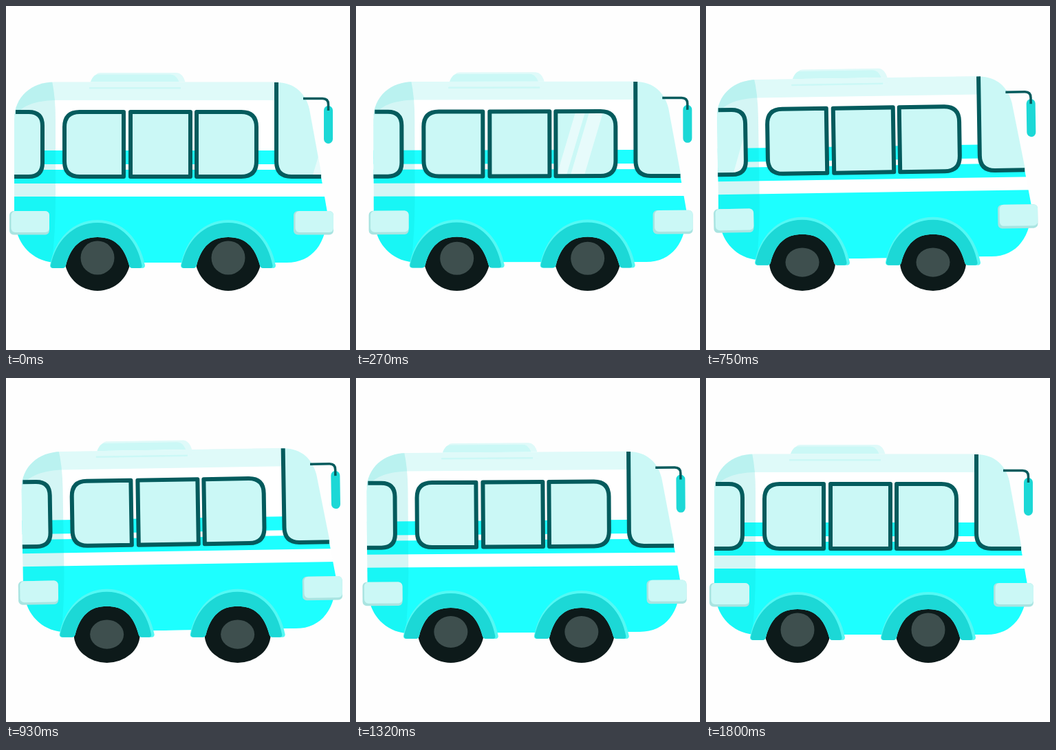
Recreate the animation shown at these times as an HTML page. Size 500 px wide and 500 px high, loop 1830 ms.

```html
<!DOCTYPE html>
<html lang="en">
<head>
<meta charset="utf-8">
<title>Bus</title>
<style>
  html, body { margin: 0; width: 100%; height: 100%; overflow: hidden; background: #fefefe; }
  svg { display: block; width: 100vw; height: 100vh; }
  .cyan { fill: #1dffff; }
  .pale { fill: #cbf8f6; }
  .mist { fill: #dffaf9; }
  .teal { fill: #1cd8d6; }
  .frame { fill: none; stroke: #045b5d; stroke-width: 6; stroke-linejoin: round; }
  .glint { fill: #fff; opacity: .55; }
</style>
</head>
<body>
<svg viewBox="0 0 500 500">
  <defs>
    <clipPath id="shell">
      <path d="M12 165C12 131 38 110.500 70 110.500H393C420 111 436 128 441 150L467 300C467 345 445 373 408 373H75C42 373 20 350 15 325L12 300Z"/>
    </clipPath>
    <g id="bumper">
      <rect width="58" height="34.500" rx="6" fill="#a9e4e1"/>
      <rect x="2.500" width="55.500" height="31" rx="6" class="pale"/>
    </g>
    <g id="fender">
      <path fill="#53f8f4" d="M-69 377C-62 339 -36 311 0 311C36 311 62 339 69 377Q69 381 65 381H51Q47 381 46 377C39 350 25 336 0 336C-25 336 -39 350 -46 377Q-47 381 -51 381H-65Q-69 381 -69 377Z"/>
      <path class="teal" d="M-68 377C-61 342 -36 315 0 315C35 315 58 342 64.500 377Q65 381 61 381H51Q47 381 46 377C39 350 25 336 0 336C-25 336 -39 350 -46 377Q-47 381 -51 381H-64Q-68 381 -68 377Z"/>
    </g>
    <g id="wheel">
      <circle cy="366" r="48" fill="#0d1a1a"/>
      <circle cy="366" r="24.500" fill="#3e4f4e"/>
    </g>
  </defs>
  <rect width="500" height="500" fill="#fefefe"/>
  <g id="bus">
    <g id="body">
      <path class="mist" d="M126 120C125 108 129 97 137 97H247C257 97 261 108 262 120Z"/>
      <path class="pale" d="M121 120.500C121 112 126 99.500 133 99.500H239C249 99.500 253 112 254 120.500Z"/>
      <g clip-path="url(#shell)">
        <rect width="500" height="400" fill="#fff"/>
        <path class="mist" d="M0 105H393V137H70C45 138 25 143 12 160H0Z"/>
        <path class="cyan" d="M0 210H393V230H0ZM0 238H480V258H0ZM0 277H480V380H0Z"/>
        <path fill="#00c8c3" opacity=".17" d="M0 105H66Q72 130 72 165V280Q72 330 66 380H0Z"/>
      </g>
      <path class="mist" d="M124 120.500H256V118H262V120.500Z"/>
      <path class="pale" d="M121 120.500V118H254V120.500Z"/>
      <g id="panes"></g>
      <rect class="teal" x="462" y="145" width="13" height="55" rx="6.500"/>
      <path class="frame" style="stroke-width:3.500" d="M432 134.500H460Q468.500 134.500 468.500 143V152"/>
    </g>
    <g id="wheels">
      <use href="#wheel" x="133"/>
      <use href="#wheel" x="323"/>
    </g>
    <g id="fenders">
      <use href="#fender" x="133"/>
      <use href="#fender" x="323"/>
    </g>
    <g id="bumpers">
      <use href="#bumper" x="5" y="298"/>
      <use href="#bumper" x="418" y="298"/>
    </g>
  </g>
</svg>
<script>
const LOOP = 1830, STEP = 30;
const $ = id => document.getElementById(id);

// Front to back, in the order the glint crosses them.
const panes = [
  { right: 459, clip: "M393 111C420 111 436 128 441 150L459 248H415Q393 248 393 226Z",
    frame: "M393 111V226Q393 248 415 248H458" },
  { right: 364, clip: "M277 154H342Q364 154 364 176V226Q364 248 342 248H277Z" },
  { right: 268, clip: "M181 154H268V248H181Z" },
  { right: 171, clip: "M171 154H107Q85 154 85 176V226Q85 248 107 248H171Z" },
  { right: 53, clip: "M15 154H33Q53 154 53 174V228Q53 248 33 248H12V165Z",
    frame: "M14 154H33Q53 154 53 174V228Q53 248 33 248H12" }
];

$("panes").innerHTML = panes.map(({ clip, frame = clip }, i) => `
  <clipPath id="pane${i}"><path d="${clip}"/></clipPath>
  <path class="pale" d="${clip}"/>
  <g clip-path="url(#pane${i})">
    <path class="glint" d="M0 151H14L-15 248H-29ZM20 151H40L11 248H-9Z"/>
  </g>
  <path class="frame" d="${frame}"/>`).join("");
const glints = document.querySelectorAll(".glint");

function ease(u) {
  u = Math.min(1, Math.max(0, u));
  const a = u ** 1.8, b = (1 - u) ** 1.8;
  return a / (a + b);
}

function draw(t) {
  const sway = 7 * (1 - Math.cos(2 * Math.PI * t / 600));
  const lift = t < 840 ? ease((t - 90) / 750) : ease((1740 - t) / 900);
  const tilt = `rotate(${-0.92 * lift} -160 360)`;

  $("bus").setAttribute("transform", `translate(${sway} 0)`);
  $("body").setAttribute("transform", tilt);
  $("bumpers").setAttribute("transform", tilt);
  $("fenders").setAttribute("transform", `translate(0 ${-4.4 * lift})`);
  $("wheels").setAttribute("transform", `translate(0 414) scale(1 ${1 - 0.14 * lift}) translate(0 -414)`);

  glints.forEach((glint, i) => {
    const age = t + 16 - 186 * i;
    glint.setAttribute("visibility", age >= 0 && age < 190 ? "visible" : "hidden");
    glint.setAttribute("transform", `translate(${panes[i].right + 29 - 0.86 * age} 0)`);
  });
}

const start = performance.now();
function tick() {
  const t = (performance.now() - start) % LOOP;
  draw(Math.floor(t / STEP) * STEP);
  requestAnimationFrame(tick);
}
tick();
</script>
</body>
</html>
```
